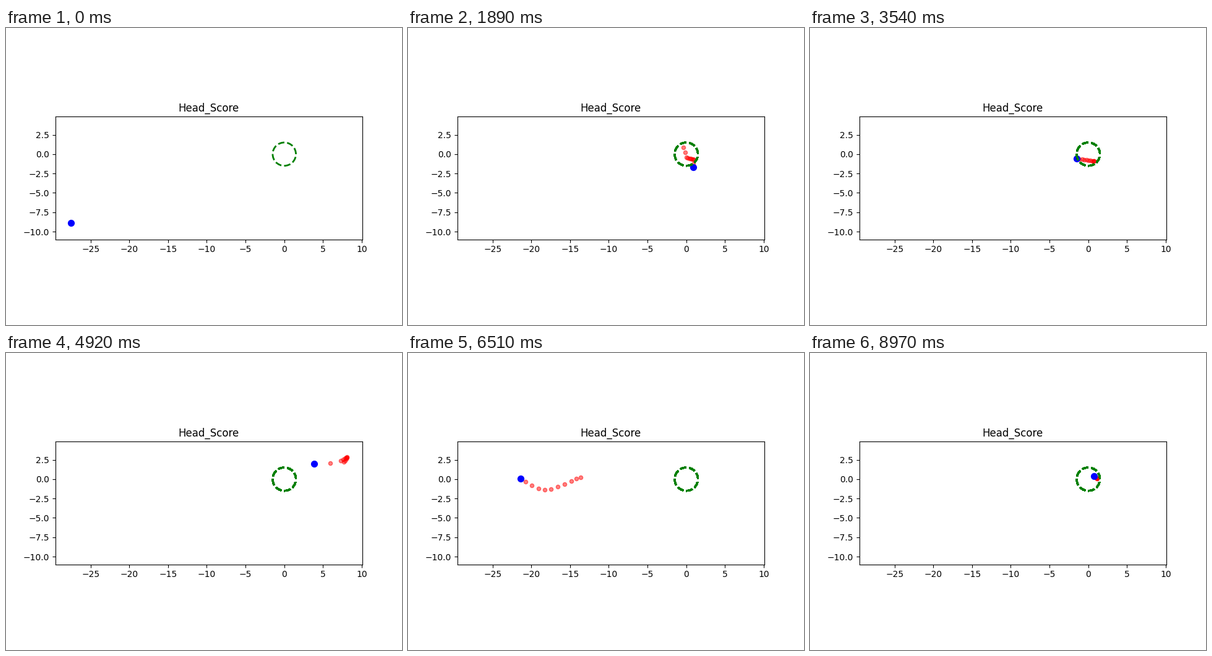
Animation of 640x480 px, one loop 9000 ms. Source, as a matplotlib script:

```python
import numpy as np
import matplotlib.pyplot as plt
from matplotlib.animation import FuncAnimation
from matplotlib.collections import PathCollection
from matplotlib.path import Path

FRAMES = 300
INTERVAL = 30
TRAIL = 10

# Turning points of the tracked head: (step, x, y)
TURNS = np.array([
    (0, -27.5, -8.87), (20, -21.7, -4.1), (34, -3.5, 2.4),
    (53, -0.35, 0.85), (55, 0, -0.4), (61, 0.95, -0.75), (63, 0.9, -1.7),
    (90, -3.1, 0), (108, 0.75, -0.9), (128, -3.7, 0.1),
    (154, 7.3, 2.4), (158, 8.08, 2.85), (162, 7.7, 2.2), (164, 3.88, 1.97),
    (186, -6.8, 0.6), (207, -13.6, 0.2), (213, -18.25, -1.38),
    (217, -21.35, 0.05), (224, -23.6, 1.1), (238, -8.05, 1.25),
    (248, 2.93, 1.85), (254, 4.4, 1.1), (280, -0.4, 1.0),
    (289, 1.15, 0.1), (299, 0.7, 0.4),
])


def smooth(t, knots, values):
    """Monotone cubic interpolation: no overshoot between turning points."""
    h = np.diff(knots)
    slope = np.diff(values) / h
    left, right = slope[:-1], slope[1:]
    same = left * right > 0
    total = np.where(same, left + right, 1)
    inner = np.where(same, 2 * left * right / total, 0)
    tangent = np.concatenate([slope[:1], inner, slope[-1:]])
    k = np.clip(np.searchsorted(knots, t, side="right") - 1, 0, len(h) - 1)
    u = (t - knots[k]) / h[k]
    return ((1 + 2 * u) * (1 - u) ** 2 * values[k]
            + u * (1 - u) ** 2 * h[k] * tangent[k]
            + u ** 2 * (3 - 2 * u) * values[k + 1]
            + u ** 2 * (u - 1) * h[k] * tangent[k + 1])


steps = np.arange(FRAMES)
knots, *coords = TURNS.T
path = np.column_stack([smooth(steps, knots, c) for c in coords])

fig, ax = plt.subplots(figsize=(6.4, 4.8), dpi=100)
ax.set_aspect("equal")
ax.set_xlim(-29.52, 10.08)
ax.set_ylim(-11.0, 4.845)
ax.set_title("Head_Score")

trail = ax.scatter([], [], s=20, color="red", alpha=0.5)
head = ax.scatter([], [], s=50, color="blue")

circle = Path.circle((0, 0), 1.5)
rings = PathCollection([circle], facecolors="none", edgecolors="green",
                       linestyles="--", linewidths=2, transform=ax.transData)
ax.add_collection(rings)


def update(i):
    trail.set_offsets(path[max(0, i - TRAIL):i])
    head.set_offsets(path[i:i + 1])
    # One more ring is laid on top at each step, which hardens its edges
    rings.set_paths([circle] * (i + 1))
    return trail, head, rings


anim = FuncAnimation(fig, update, frames=FRAMES, interval=INTERVAL,
                     repeat=True, repeat_delay=0)
plt.show()
```
